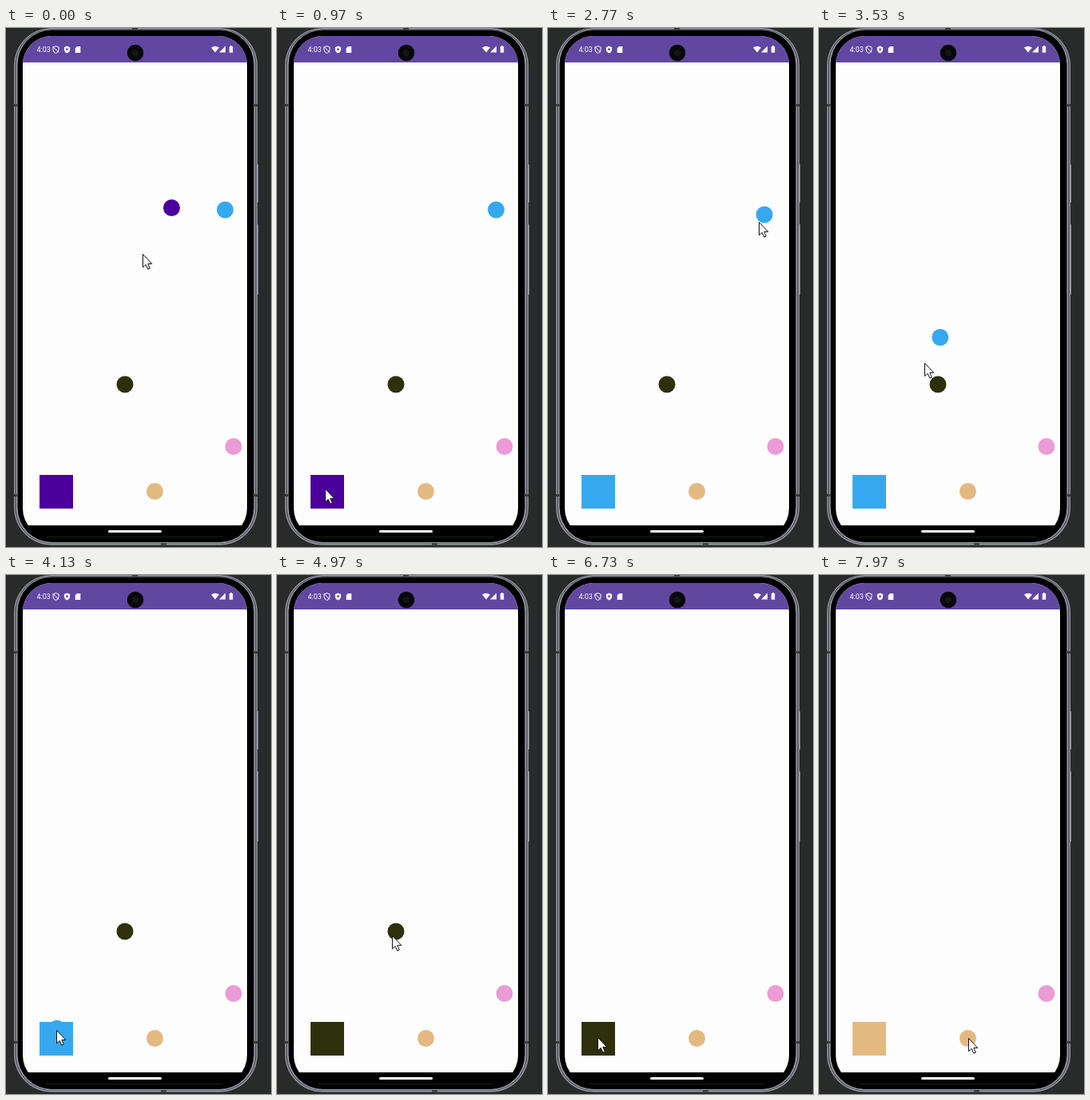
An HTML page with a canvas for the animation above (8000 ms loop, 332x648 px).

```html
<!DOCTYPE html>
<html lang="en">
<head>
<meta charset="utf-8">
<title>Sort the dots</title>
<style>
html, body { margin: 0; width: 100%; height: 100%; overflow: hidden; background: #282b2a; }
canvas { display: block; }
</style>
</head>
<body>
<canvas id="stage" width="332" height="648"></canvas>
<script>
const ctx = document.getElementById('stage').getContext('2d');
const LOOP = 8000;
const LAG = 85; // a dragged ball trails the pointer by this many ms
const WHITE = '#fdfdfd';
const BAR = '#6147a0';
const SILVER = '#989aa6';
const GRAPHITE = '#3a3b40';

// Pointer stops: time, x, y. Repeated positions are pauses.
const pointerPath = [
  [0, 171, 282], [270, 207, 225], [400, 207, 225], [900, 60, 575], [1170, 60, 575],
  [1870, 244, 263], [2130, 275, 228], [2570, 275, 228], [3445, 152, 386],
  [3530, 132, 418], [4090, 63, 568], [4350, 63, 568], [5050, 147, 446],
  [5940, 147, 446], [6600, 62, 577], [6950, 62, 577], [7700, 187, 578], [8000, 187, 578]
];

const balls = [
  { color: '#4b009c', x: 207.5, y: 224.5, grab: 400, drop: 1100 },
  { color: '#36a8f0', x: 274.5, y: 227, grab: 2570, drop: 4280 },
  { color: '#2e300c', x: 149, y: 445, grab: 5940, drop: 6850 },
  { color: '#e3b982', x: 186.5, y: 578.5, grab: Infinity, drop: Infinity },
  { color: '#eb9bd6', x: 285, y: 522.5, grab: Infinity, drop: Infinity }
];

// Velocity at a stop, zero when it borders a pause.
function velocity(i, axis) {
  const [a, b, c] = [pointerPath[i - 1], pointerPath[i], pointerPath[i + 1]];
  if (!a || !c || a[axis] === b[axis] || b[axis] === c[axis]) return 0;
  if ((b[axis] - a[axis]) * (c[axis] - b[axis]) < 0) return 0;
  return (c[axis] - a[axis]) / (c[0] - a[0]);
}

function pointerAt(t) {
  let i = 0;
  while (i < pointerPath.length - 2 && pointerPath[i + 1][0] <= t) i++;
  const a = pointerPath[i], b = pointerPath[i + 1];
  const span = b[0] - a[0];
  const u = Math.max(0, Math.min(1, (t - a[0]) / span));
  return [1, 2].map(axis => {
    const blend = u * u * (3 - 2 * u);
    return a[axis] + (b[axis] - a[axis]) * blend
      + span * velocity(i, axis) * u * (1 - u) ** 2
      - span * velocity(i + 1, axis) * u * u * (1 - u);
  });
}

function rect(x, y, w, h, color) {
  ctx.fillStyle = color;
  ctx.fillRect(x, y, w, h);
}

function disc(x, y, r, color) {
  ctx.fillStyle = color;
  ctx.beginPath();
  ctx.arc(x, y, r, 0, Math.PI * 2);
  ctx.fill();
}

function rounded(x, y, w, h, r, color) {
  ctx.fillStyle = color;
  ctx.beginPath();
  ctx.roundRect(x, y, w, h, r);
  ctx.fill();
}

function shape(d, x, y, fill, stroke) {
  const path = new Path2D(d);
  ctx.save();
  ctx.translate(x, y);
  if (fill) { ctx.fillStyle = fill; ctx.fill(path); }
  if (stroke) { ctx.strokeStyle = stroke; ctx.lineWidth = 1; ctx.stroke(path); }
  ctx.restore();
}

function drawPhone() {
  rect(0, 0, 332, 648, '#282b2a');
  rounded(313, 170, 3, 48, 1, SILVER);
  rounded(313, 245, 3, 88, 1, SILVER);
  rounded(10, 0, 305, 645.5, 47, SILVER);
  rounded(11.4, 1, 302.2, 643.1, 46, GRAPHITE);
  rounded(12.6, 1.5, 299.8, 642, 45, SILVER);
  rounded(14.5, 2.5, 296, 639.5, 43, '#000');
  for (const y of [95, 582]) {
    rect(10, y, 4, 3, GRAPHITE);
    rect(311, y, 4, 3, GRAPHITE);
  }
  rect(158, 0, 7, 2, GRAPHITE);
  rect(194, 643, 7, 2.5, GRAPHITE);
  rect(50, 635, 222, 1, '#1c1d1e');
}

function drawStatusBar() {
  rect(21, 10, 281, 33, BAR);
  ctx.fillStyle = WHITE;
  ctx.font = '9px Roboto, sans-serif';
  ctx.fillText('4:03', 38.5, 30);

  const shield = 'M0 -4.5L3.6 -3V0Q3.3 3.3 0 4.6Q-3.3 3.3 -3.6 0V-3Z';
  shape(shield, 62.5, 27, null, WHITE);
  shape('M-3.5 -3.5L3.5 3.5', 62.5, 27, null, WHITE);
  shape(shield, 76.5, 27, WHITE);
  disc(76.5, 26.7, 1.4, BAR);
  shape('M-1 -4H3.3V4H-3.3V-1.7Z', 90, 27, WHITE);
  shape('M0 4L-5 -2Q0 -5.6 5 -2Z', 262, 26.5, WHITE);
  shape('M4 -4V4H-4Z', 271, 26.5, WHITE);
  shape('M-1 -4.5H1V-3.5H2.2V4.2H-2.2V-3.5H-1Z', 282, 26.5, WHITE);

  disc(162, 31, 10.3, '#080808');
  disc(162, 31, 4, '#151517');
}

function drawScreen() {
  ctx.save();
  ctx.beginPath();
  ctx.roundRect(21, 10, 281, 626, 36);
  ctx.clip();
  rect(21, 10, 281, 611, WHITE);
  drawStatusBar();
  rect(21, 621, 281, 14, '#000');
  ctx.restore();
  rounded(128, 627, 67, 3, 1.5, WHITE);
}

function draw(t) {
  drawPhone();
  drawScreen();

  const remaining = balls.filter(ball => t < ball.drop);
  rect(42, 558, 42, 42, remaining[0].color);
  for (const ball of [...remaining].reverse()) {
    const held = t >= ball.grab;
    const [x, y] = held ? pointerAt(Math.max(ball.grab, t - LAG)) : [ball.x, ball.y];
    disc(x, y, 10.5, ball.color);
  }

  const [px, py] = pointerAt(t).map(Math.round);
  shape('M.5 .5V16.8L4.2 13.4L6.8 19.2L9.3 18.1L6.8 12.4H11.8Z', px, py, WHITE, '#111');
}

function tick(now) {
  draw(now % LOOP);
  requestAnimationFrame(tick);
}
draw(0);
requestAnimationFrame(tick);
</script>
</body>
</html>
```
